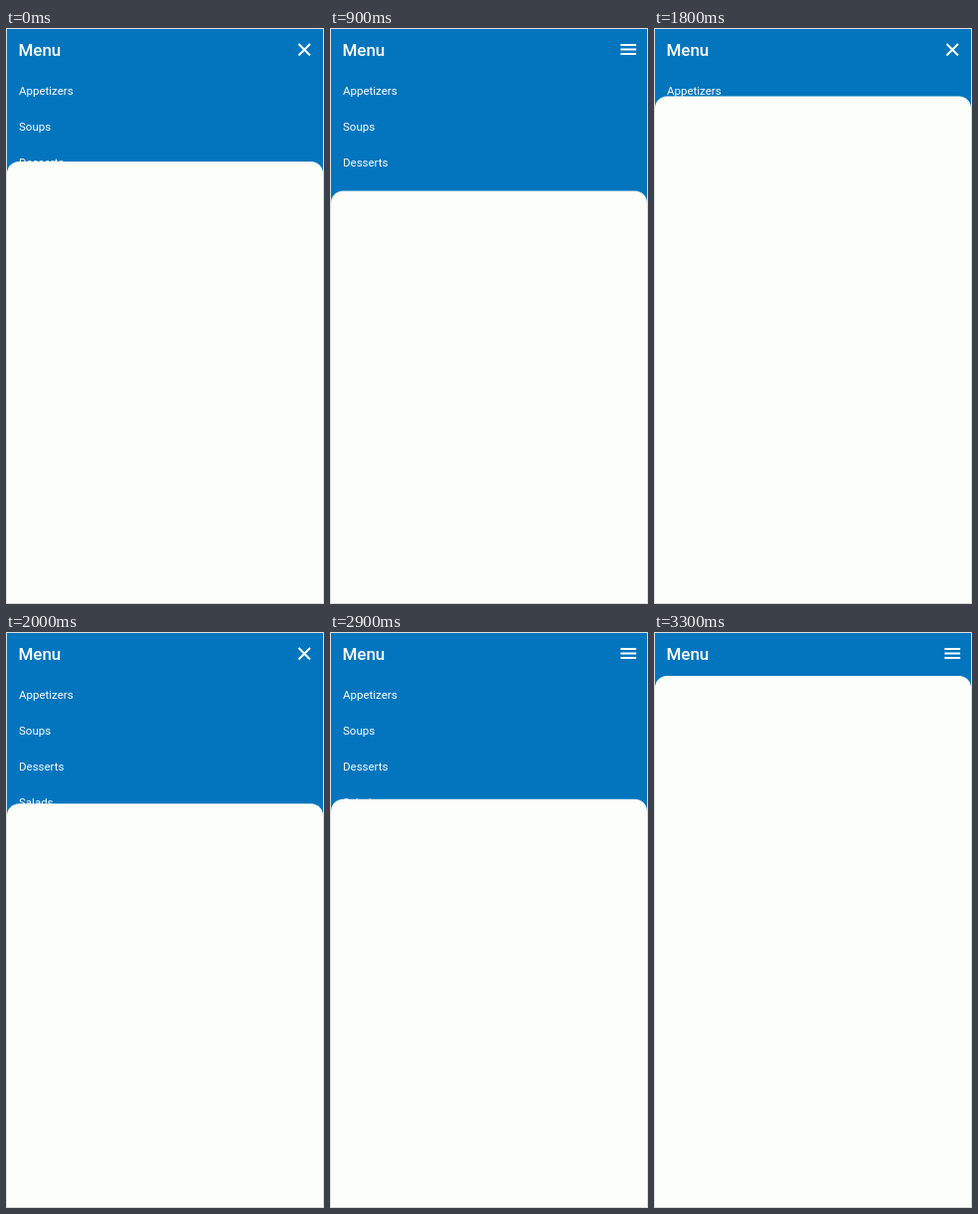
An HTML page that plays this animation: 320 px wide and 578 px high, repeating every 3400 ms.

```html
<!DOCTYPE html>
<html lang="en">
<head>
<meta charset="utf-8">
<title>Backdrop menu</title>
<style>
  html, body { margin: 0; height: 100%; overflow: hidden; }
  svg { display: block; width: 320px; height: 578px; background: #0275be; }
  text { font: 400 11.5px Roboto, sans-serif; fill: #fff; }
  .title { font-weight: 500; font-size: 17px; }
  .icon { fill: none; stroke: #fff; stroke-width: 2.1; }
</style>
</head>
<body>
<svg viewBox="0 0 320 578">
  <text class="title" x="12.4" y="28">Menu</text>
  <text x="13" y="67">Appetizers</text>
  <text x="13" y="103">Soups</text>
  <text x="13" y="139">Desserts</text>
  <text x="13" y="175">Salads</text>
  <path id="close" class="icon" d="M294.5 16l11.5 11.5M306 16l-11.5 11.5"/>
  <path id="burger" class="icon" d="M292.4 17h15.8M292.4 21.5h15.8M292.4 26h15.8"/>
  <rect id="panel" x="1" width="318" height="600" rx="12" fill="#fcfefa"/>
  <rect x=".5" y=".5" width="319" height="577" fill="none" stroke="#ddd"/>
</svg>
<script>
const LOOP = 3400, DURATION = 400, CLOSED_Y = 44, OPEN_Y = 191;
const toggles = [
  { start: -228, open: true },
  { start: 787, open: false },
  { start: 1694, open: true },
  { start: 2797, open: false }
];
const [panel, closeIcon, burger] = ['panel', 'close', 'burger'].map(id => document.getElementById(id));
const easeInOut = x => (1 - Math.cos(Math.PI * x)) / 2;

function draw(now) {
  const time = now % LOOP;
  const { start, open } = toggles.findLast(toggle => toggle.start <= time);
  const progress = easeInOut(Math.min(1, (time - start) / DURATION));
  const openness = open ? progress : 1 - progress;
  panel.setAttribute('y', CLOSED_Y + (OPEN_Y - CLOSED_Y) * openness);
  closeIcon.style.display = open ? '' : 'none';
  burger.style.display = open ? 'none' : '';
}

const origin = performance.now();
function tick() {
  draw(performance.now() - origin);
  requestAnimationFrame(tick);
}
tick();
</script>
</body>
</html>
```
